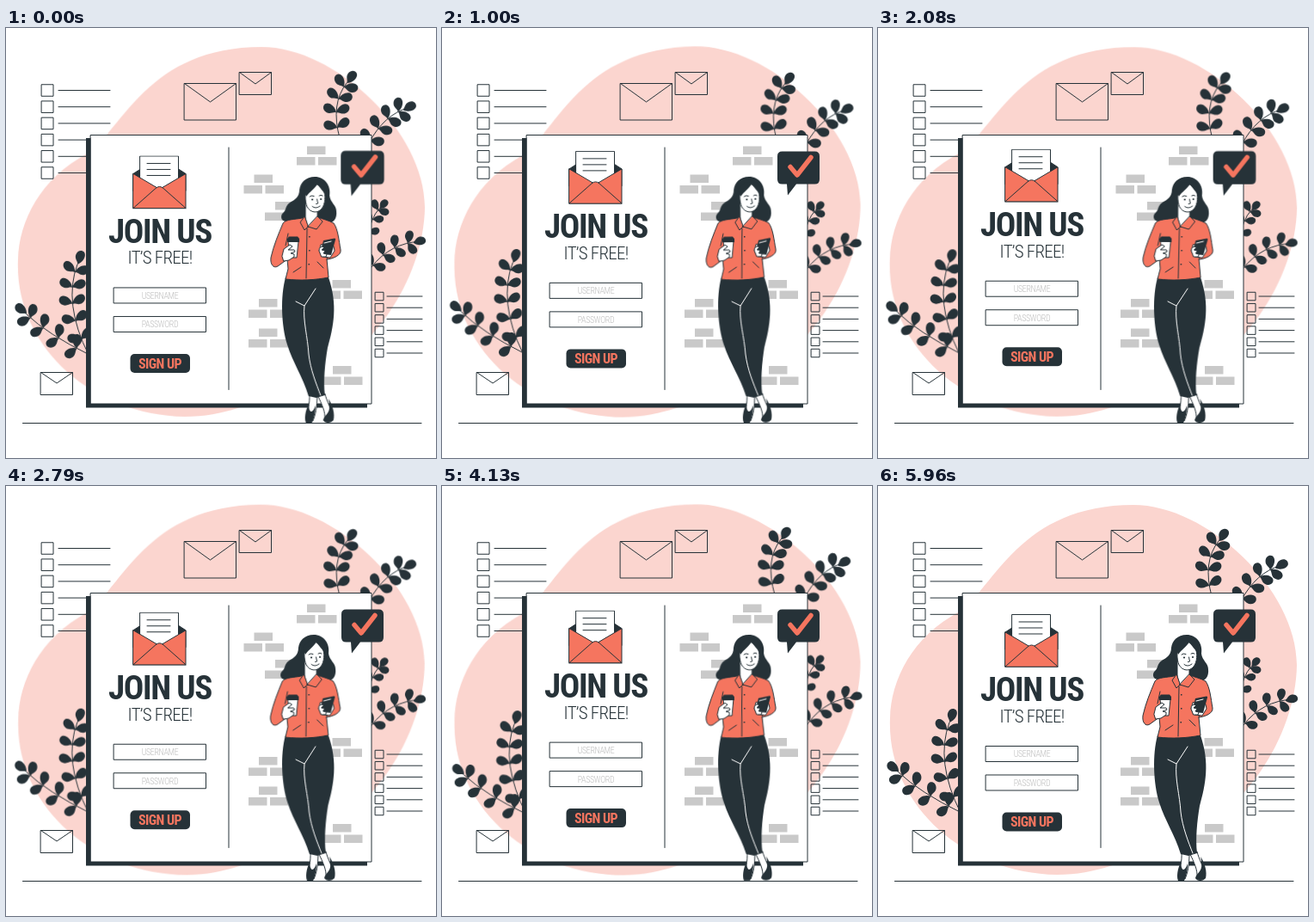
An HTML page for the animation above (6000 ms loop, 500 by 500 pixels).

```html
<!DOCTYPE html>
<html lang="en">
<head>
<meta charset="utf-8">
<title>Join us</title>
<style>
  html, body { margin: 0; width: 100%; height: 100%; overflow: hidden; background: #fff; }
  svg { display: block; width: 100%; height: 100%; }
  :root { --ink: #263238; --coral: #f5755f; --blush: #fbd5cf; --brick: #c9c9c9; }

  .ink { fill: var(--ink); }
  .coral { fill: var(--coral); }
  .white { fill: #fff; }
  .line { stroke: var(--ink); stroke-width: 1; stroke-linejoin: round; stroke-linecap: round; }
  .open { fill: none; }
  .fold { fill: none; stroke: #fff; stroke-width: 1; stroke-linecap: round; stroke-linejoin: round; }

  text {
    font-family: "Roboto Condensed", Roboto, sans-serif;
    font-stretch: 75%;
    letter-spacing: -.035em;
    text-anchor: middle;
  }
  .title { font-size: 39px; font-weight: 700; }
  .sub { font-size: 21px; font-weight: 300; }
  .hint { font-size: 10px; font-weight: 300; fill: #bdbdbd; }
  .cta { font-size: 16px; font-weight: 700; }

  .wind, .float, .beat { animation: wind 1.5s linear -40ms infinite; }
  .blob { transform-origin: 250.5px 237px; }
  .plants { transform-origin: 249px 216px; animation-duration: 6s; }
  .woman { transform-origin: 348.5px 316px; }
  .float { animation-name: float; }
  .beat { transform-origin: 414.5px 168.5px; animation-name: beat; }

  @keyframes wind {
    0%, 100% { transform: rotate(0deg); }
    25% { transform: rotate(1deg); }
    75% { transform: rotate(-1deg); }
  }
  @keyframes float {
    0%, 100% { transform: translateY(0); }
    50% { transform: translateY(-10px); }
  }
  @keyframes beat {
    0%, 30%, 40%, 60%, 100% { transform: scale(1); }
    10%, 50% { transform: scale(1.1); }
  }
</style>
</head>
<body>
<svg viewBox="0 0 500 500">
  <defs>
    <g id="bricks" fill="var(--brick)">
      <rect x="12" width="21.5" height="9.5"/>
      <rect y="12.5" width="21.5" height="9.5"/>
      <rect x="25" y="12.5" width="21.5" height="9.5"/>
    </g>
    <path id="leaf" d="M0 0C3 0 4 -5 9 -5C14 -5 16 -1 14.5 2C12 6 4 5 0 0Z"/>
  </defs>

  <path class="wind blob" fill="var(--blush)" d="M14 270C15 225 40 175 95 146C135 118 165 22 297 22C382 22 487 120 487 208C486 290 425 390 330 420C285 436 255 452 208 452C100 450 10 370 14 270Z"/>

  <g id="lists" class="line open"></g>

  <g class="line open">
    <path d="M207.5 64.5H267.5V107H207.5ZL237.5 86L267.5 64.5"/>
    <path d="M271.5 51.5H308.5V77.5H271.5ZL290 65L308.5 51.5"/>
    <path d="M40.5 400.5H77.5V426.5H40.5ZL59 413L77.5 400.5"/>
    <path d="M19.5 459.5H483"/>
  </g>

  <g id="plants" class="wind plants ink"></g>

  <rect class="ink" x="93" y="128" width="327" height="313.5"/>
  <rect class="white line" x="98.5" y="124.5" width="326.5" height="312.5"/>
  <path class="line" d="M259 139V420.5"/>
  <g id="wall"></g>

  <g class="float">
    <path class="ink line" d="M148 170L156.5 164.5H200.5L209 170V190H148Z"/>
    <path class="white line" d="M156 149.5H200.5V195H156Z"/>
    <path class="line" d="M164 158H191M164 165H191M164 172H191"/>
    <path class="coral line" d="M148 170L178.5 188L209 170V210H148Z"/>
    <path class="coral line" d="M148 210L174 187Q178.500 183 183 187L209 210Z"/>
    <text class="title ink" x="179" y="250.500">JOIN US</text>
    <text class="sub ink" x="179" y="275">IT’S FREE!</text>
    <rect class="white line" x="125.5" y="302.5" width="107" height="18"/>
    <text class="hint" x="179" y="315.500">USERNAME</text>
    <rect class="white line" x="125.5" y="336" width="107" height="18"/>
    <text class="hint" x="179" y="349">PASSWORD</text>
    <rect class="ink" x="144.5" y="379.5" width="69.500" height="22" rx="5"/>
    <text class="cta coral" x="179" y="396.500">SIGN UP</text>
  </g>

  <g class="wind woman">
    <!-- hair -->
    <path class="ink" d="M359 173C348 173 342 180 341 188C341 197 335 200 330 203C324 207 326 212 322 215C318 219 320 225 326 225L345 232L372 227C380 228 385 222 384 213C384 206 377 203 376 195C378 183 370 173 359 173Z"/>
    <!-- feet -->
    <path class="white line" d="M353 425L362 427C362 441 360 450 357 457L350 455C350 446 354 438 353 425Z"/>
    <path class="ink" d="M352 438C348 445 347 455 349 459H356C359 452 360 446 360 439C357 448 353 449 352 438Z"/>
    <path class="white line" d="M363 428L371 425C373 434 379 443 380 453L371 456C372 446 367 437 363 428Z"/>
    <path class="ink" d="M375 431C380 438 383 449 381 456C378 460 371 460 369 456C370 452 372 451 374 448C377 444 377 438 375 431Z"/>
    <!-- trousers -->
    <path class="ink" d="M325 290C319 312 320 345 327 368C334 390 345 405 352 428L361 430L371 427C369 410 371 390 374 372C381 347 386 322 375 290Z"/>
    <path class="fold" d="M337 318L347 323L360 303M347 323C345 340 351 360 352 379C354 397 361 414 366 427"/>
    <!-- shirt -->
    <path class="coral line" d="M344 221C335 223 326 222 322 227C317 239 311 253 308 267C307 275 311 280 316 277L327 269L328 280L325 292C342 294 360 293 375 290L373 269C381 268 390 264 389 258C387 247 386 234 381 227C376 224 368 222 362 220Z"/>
    <path class="line open" d="M328 239L325 253M327 268L329 256M373 269L374 264M350 233L349 291M343 278L334 284M362 272L369 279"/>
    <path class="ink" d="M352 242h1.5v1.5h-1.5zM352 258h1.5v1.5h-1.5zM351.5 274h1.5v1.5h-1.5z"/>
    <!-- neck, collar, face -->
    <path class="white line" d="M348 204V222L351 232L362 221V207Z"/>
    <path class="coral line" d="M347 219L342 226L347 235L351 231ZM362 219L368 225L361 234L351 231Z"/>
    <path class="white line" d="M351 184C347 190 347 201 350 208C354 215 362 216 367 210C371 205 372 195 369 187L362 182Z"/>
    <path class="ink" d="M363 180C358 188 353 190 349 196L346 188L354 179ZM361 180C365 187 369 189 371 195L374 189L368 179Z"/>
    <path class="line open" d="M353 196Q355 194 358 195.5M364 195Q366 193.5 368 195M361.5 199L362.5 204L360.5 204.5M356 207.5Q360 211 365 207"/>
    <circle class="ink" cx="356" cy="199.5" r="1.1"/>
    <circle class="ink" cx="366" cy="199" r="1.1"/>
    <!-- cup -->
    <path class="white line" d="M328 248L330 267H338L340 248Z"/>
    <path class="ink" d="M327 245L329 242.5H339L341 245V249H327Z"/>
    <path class="white line" d="M321 265L323 257L330 252L333 254L328 258H335L336 260L331 262L335 263L335 266L329 270L323 271Z"/>
    <!-- phone -->
    <path class="white line" d="M366 252L364 259L368 266L377 267L382 259L381 254Z"/>
    <path class="ink" d="M369 247L382 244.5Q383.5 244.5 383 246L378 264L365 262.5Z"/>
    <path class="white line" d="M364 259Q363 256 367 254L370 255L367 258L371 259L369 262L373 263L372 266L367 266Z"/>
    <path class="fold" d="M370 250L378 248"/>
  </g>

  <g class="beat">
    <path class="ink" d="M395.5 143.5H433.5Q439 143.5 439 149V176Q439 181.5 433.5 181.5H412L402 194.5L401 181.5H395.5Q390 181.5 390 176V149Q390 143.5 395.5 143.5Z"/>
    <path class="open" stroke="var(--coral)" stroke-width="5.5" stroke-linecap="round" stroke-linejoin="round" d="M405 161.5L413 171L429 150.5"/>
  </g>
</svg>
<script>
  const put = (id, html) => document.getElementById(id).insertAdjacentHTML("beforeend", html);
  const rows = (n, draw) => Array.from({ length: n }, (_, i) => draw(i)).join("");

  const list = (x, y, step, size, from, to) => rows(6, i => {
    const cy = y + i * step;
    return `<path d="M${x} ${cy - size / 2}h${size}v${size}h${-size}zM${from} ${cy}H${to}"/>`;
  });
  put("lists", list(41.5, 72.5, 19.2, 13.5, 61, 121) + list(429.5, 312, 13.2, 9.5, 443, 484));

  const walls = [[338, 137.5], [276.5, 170.5], [301, 202], [367.5, 293], [282, 315], [282, 349.5], [368, 393]];
  put("wall", walls.map(([x, y]) => `<use href="#bricks" x="${x}" y="${y}"/>`).join(""));

  const leaf = (x, y, angle, size, side) =>
    `<use href="#leaf" transform="translate(${x} ${y}) rotate(${angle}) scale(${size} ${size * side})"/>`;

  // A stem along a quadratic curve with n leaf pairs and one leaf at the tip.
  function branch(x0, y0, cx, cy, x1, y1, n, size = 1.12) {
    const at = (a, b, c, t) => (1 - t) ** 2 * a + 2 * t * (1 - t) * b + t * t * c;
    const slope = (a, b, c, t) => (1 - t) * (b - a) + t * (c - b);
    const angle = t => Math.atan2(slope(y0, cy, y1, t), slope(x0, cx, x1, t)) * 180 / Math.PI;
    const pairs = rows(n, i => {
      const t = 0.15 + 0.75 * i / (n - 1);
      const x = at(x0, cx, x1, t), y = at(y0, cy, y1, t), a = angle(t);
      return leaf(x, y, a - 60, size, 1) + leaf(x, y, a + 60, size, -1);
    });
    return `<path class="line open" d="M${x0} ${y0}Q${cx} ${cy} ${x1} ${y1}"/>` + pairs + leaf(x1, y1, angle(1), size, 1);
  }
  put("plants",
    branch(97, 380, 48, 356, 24, 333, 4) +
    branch(96, 380, 66, 320, 83, 275, 5) +
    branch(388, 128, 377, 88, 396, 64, 4) +
    branch(418, 142, 434, 106, 461, 95, 4) +
    branch(420, 285, 440, 254, 473, 249, 4, 1.02) +
    branch(420, 246, 424, 220, 434, 210, 3, .9));
</script>
</body>
</html>
```
